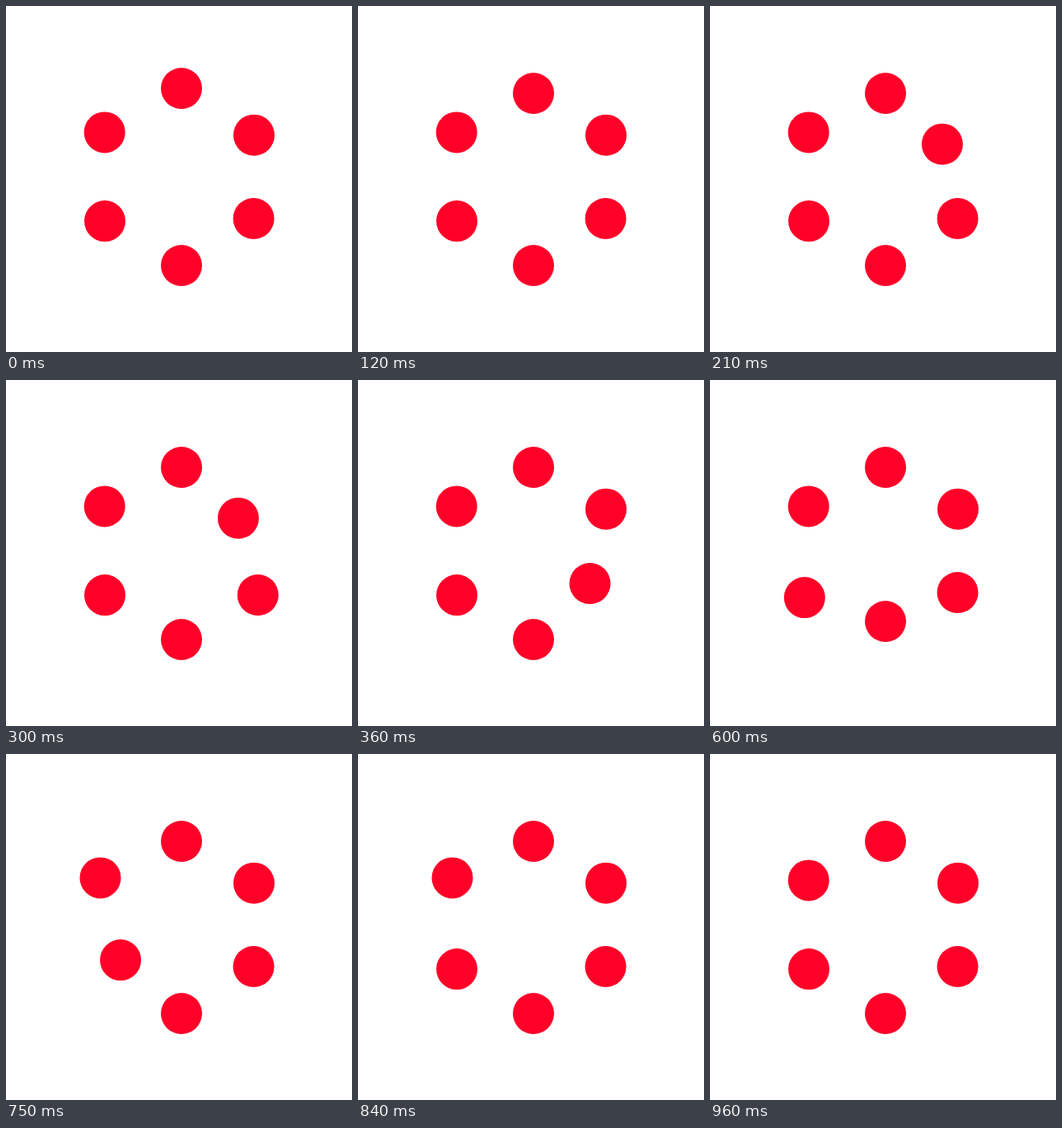
An HTML page that plays this animation: 420 px wide and 420 px high, repeating every 1390 ms.

```html
<!DOCTYPE html>
<html lang="en">
<head>
<meta charset="utf-8">
<title>Shaking dots</title>
<style>
  html, body { margin: 0; width: 100%; height: 100%; overflow: hidden; background: #fff; }
  svg { display: block; width: 100%; height: 100%; }
</style>
</head>
<body>
<svg viewBox="0 0 420 420" fill="#ff0029"></svg>
<script>
const LOOP = 1390, STEP = 30;
const STAGGER = 5;            // steps between one dot's start and the next
const SHAKE = [6, 0, -22];    // outward, rest, inward
const SHAKE_STEPS = 7;

// Resting centres, clockwise from the top
const centres = [
  [213, 106], [301, 156.7], [300.6, 258],
  [213, 315], [120, 261.1], [119.7, 153.4]
];

const svg = document.querySelector('svg');
const dots = centres.map(([cx, cy], i) => {
  const el = document.createElementNS(svg.namespaceURI, 'circle');
  el.setAttribute('cx', cx);
  el.setAttribute('cy', cy);
  el.setAttribute('r', 25);
  svg.append(el);
  const angle = (i * 60 - 90) * Math.PI / 180;
  return { el, dx: Math.cos(angle), dy: Math.sin(angle) };
});

function draw(time) {
  const step = Math.floor(time % LOOP / STEP);
  dots.forEach(({ el, dx, dy }, i) => {
    const n = step - i * STAGGER;
    const shift = n >= 0 && n < SHAKE_STEPS ? SHAKE[n % SHAKE.length] : 0;
    el.setAttribute('transform', `translate(${dx * shift} ${dy * shift})`);
  });
}

let start;
function tick(now) {
  start ??= now;
  draw(now - start);
  requestAnimationFrame(tick);
}
draw(0);
requestAnimationFrame(tick);
</script>
</body>
</html>
```
